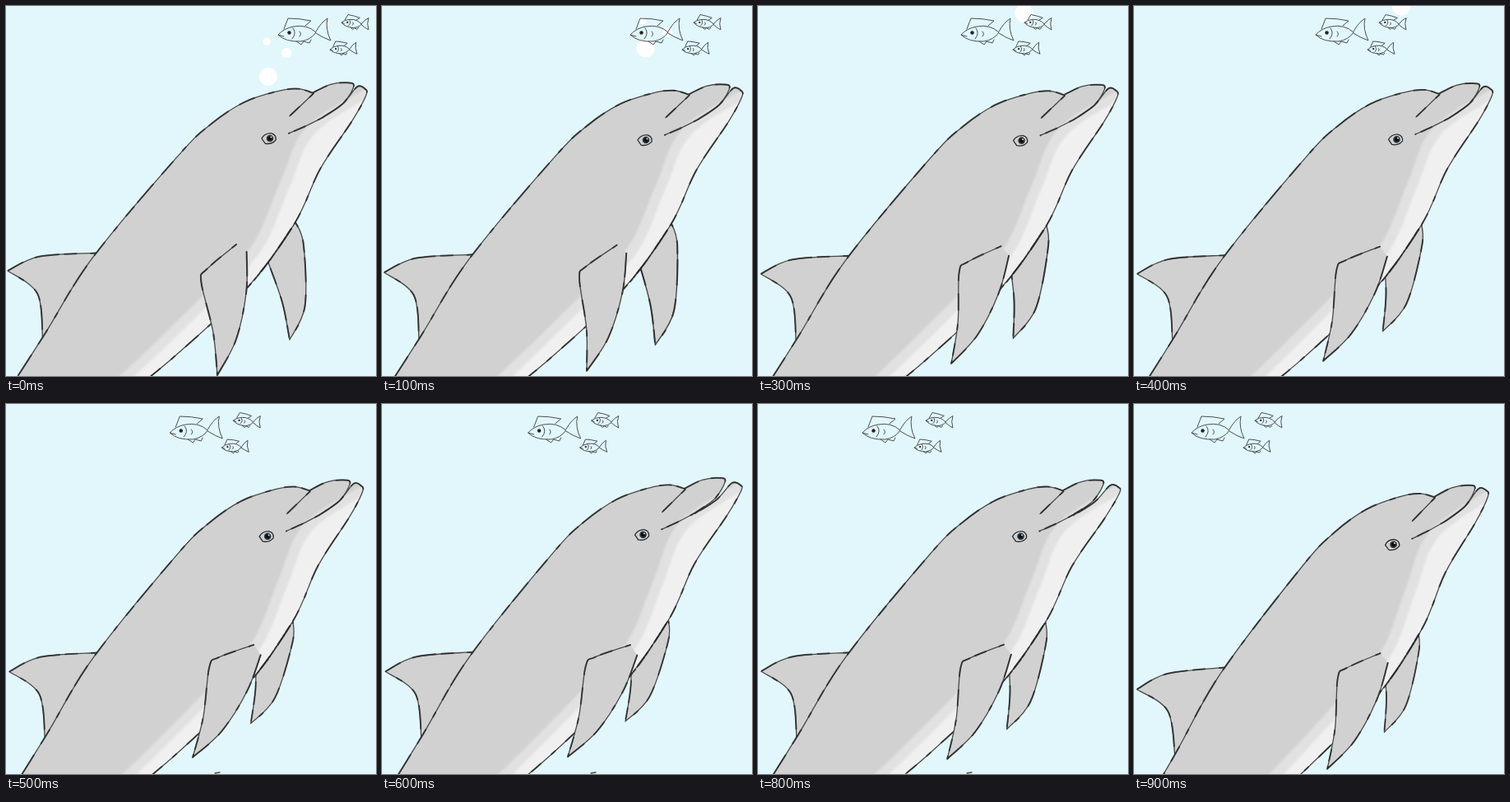
These frames come from a looping animation (450 px wide and 450 px high, 1 s). An HTML page:

```html
<!DOCTYPE html>
<html lang="en">
<head>
<meta charset="utf-8">
<title>Dolphin and fish</title>
<style>
  html, body { margin: 0; width: 100%; height: 100%; overflow: hidden; background: #e2f7fb; }
  svg { display: block; width: 100%; height: 100%; }
  .skin { fill: #d1d1d1; }
  .ink, .sketch { fill: none; stroke-linecap: round; stroke-linejoin: round; }
  .ink { stroke: #484848; stroke-width: 1.3; }
  .sketch { stroke: #262626; stroke-width: 2; opacity: .75; }
  #fish { fill: none; stroke: #4a5052; stroke-linejoin: round; stroke-linecap: round; }
  #fish path { vector-effect: non-scaling-stroke; }
  #fish circle { fill: #222; stroke: none; }
</style>
</head>
<body>
<svg viewBox="0 0 450 450">
  <defs>
    <clipPath id="inside"><path id="clip"/></clipPath>
    <filter id="soft" x="-5%" y="-5%" width="110%" height="110%"><feGaussianBlur stdDeviation="1.2"/></filter>
  </defs>
  <rect width="450" height="450" fill="#e2f7fb"/>
  <g id="bubbles" fill="#fff"></g>
  <g id="fish"></g>
  <g id="far"></g>
  <g id="body">
    <g id="fin"></g>
    <path id="hide" class="skin"/>
    <g id="belly" clip-path="url(#inside)"></g>
    <g id="lines"></g>
    <path d="M311 161Q315 154 323 155Q329 157 328 163Q323 169 315 167Z" fill="#cdd1d3" stroke="#2c2c2c" stroke-width="1.3"/>
    <circle cx="321" cy="161" r="4.3" fill="#30353a"/>
    <circle cx="321" cy="161" r="2.5" fill="#0c0c0c"/>
    <circle cx="322.500" cy="159.500" r="1" fill="#ddd"/>
  </g>
  <g id="near"></g>
  <path id="speck" d="M254 449L260 448" class="ink"/>
</svg>
<script>
const $ = id => document.getElementById(id);

let seed = 11;
const random = () => (seed = seed * 16807 % 2147483647) / 2147483647;

// Smooth curve through a flat list x, y, x, y ...
function curve(list, start = 'M') {
  const n = list.length / 2;
  const at = i => { i = Math.max(0, Math.min(n - 1, i)); return [list[2 * i], list[2 * i + 1]]; };
  let d = start + at(0);
  for (let i = 0; i < n - 1; i++) {
    const [a, b, c, e] = [at(i - 1), at(i), at(i + 1), at(i + 2)];
    const p = [0, 1].map(k => b[k] + (c[k] - a[k]) / 6);
    const q = [0, 1].map(k => c[k] - (e[k] - b[k]) / 6);
    d += `C${p} ${q} ${c}`;
  }
  return d;
}

// Turn, scale and shift that carries points a, b onto c, d
function carry([ax, ay, bx, by], [cx, cy, dx, dy]) {
  const ux = bx - ax, uy = by - ay, vx = dx - cx, vy = dy - cy;
  const len = ux * ux + uy * uy;
  const r = (ux * vx + uy * vy) / len, s = (ux * vy - uy * vx) / len;
  return `matrix(${r},${s},${-s},${r},${cx - r * ax + s * ay},${cy - s * ax - r * ay})`;
}

// Straight moves between [step, value] keys
function track(k, ...keys) {
  const i = keys.findIndex(key => key[0] >= k);
  if (i < 0) return keys[keys.length - 1][1];
  if (i === 0) return keys[0][1];
  const [[a, u], [b, v]] = [keys[i - 1], keys[i]];
  return u + (v - u) * (k - a) / (b - a);
}

// Even pencil line with darker, broken pressure over it
const dashes = Array.from({ length: 8 }, () => 6 + 26 * random());
const inked = d => `<path class="ink" d="${d}"/><path class="sketch" stroke-dasharray="${dashes}" d="${d}"/>`;
function limb(front, rear) {
  const d = curve(front) + curve(rear, 'L');
  return `<path class="skin" d="${d}Z"/>` + inked(d);
}

$('near').innerHTML = limb(
  [297, 295, 255, 312, 244, 324, 239, 385, 228, 435],
  [228, 435, 262, 402, 291, 352, 306, 307]);
$('far').innerHTML = limb(
  [349, 262, 351, 290, 332, 362, 303, 396],
  [303, 396, 307, 350, 304, 298]);
$('fin').innerHTML = limb([109, 299, 40, 303, 2, 320], [2, 320, 38, 348, 44, 403]);

const back = [-10, 484, 46, 398, 105, 305, 210, 181, 250, 143, 290, 117, 330, 104, 355, 101, 373, 106];
const beak = [373, 106, 395, 96, 415, 94, 423, 98, 410, 119, 385, 136];
const jaw = [385, 136, 410, 119, 427, 99, 436, 101, 438, 109, 421, 140, 382, 198, 350, 265,
  290, 345, 205, 424, 130, 484];
const details = curve([385, 136, 365, 146, 344, 155]) + curve([374, 107, 360, 120, 345, 134]);
const scribble = curve([346, 271, 320, 309, 301, 333]);

// The light underside is the shaded one moved toward the belly
const under = curve([440, 100, 365, 148, 333, 215, 299, 290, 240, 350, 170, 418, 105, 478]) + 'L250 490L470 260Z';
$('belly').innerHTML = [['#e1e1e1', 0], ['#f0f0f0', 11]].map(([fill, gap]) =>
  `<path d="${under}" fill="${fill}" filter="url(#soft)" transform="translate(${gap},${gap * .6})"/>`).join('');

const fish = `
  <path d="M0 0Q7 -8 19 -10Q35 -13 46 -3Q40 6 28 8Q9 9 0 0L7 2"/>
  <path d="M7 -7L12 -20Q26 -20 40 -17L33 -11M46 -4Q52 -15 60 -20Q57 -7 64 7Q55 4 46 -2"/>
  <path d="M18 -8Q23 -2 17 5M26 -4Q29 -1 26 2M22 8L28 12L31 8L38 10L40 6"/>
  <circle cx="13.500" cy="-2.500" r="2.200"/>`;
$('fish').innerHTML = [[331, 36, 1, 0], [408, 21, .53, 9], [394, 54, .52, 3]].map(([x, y, size, turn]) =>
  `<g transform="translate(${x},${y}) rotate(${turn}) scale(${size})">${fish}</g>`).join('');

function drawBody(open) {
  const pull = i => open * Math.max(0, 1 - Math.abs(i - 3) / 3.5);
  const lower = jaw.map((v, i) => v + pull(i >> 1) * (i % 2 ? 5 : 11));
  const outline = curve(back) + curve(beak, 'L') + curve(lower, 'L');
  $('hide').setAttribute('d', outline);
  $('clip').setAttribute('d', outline);
  $('lines').innerHTML = inked(outline + details) +
    `<path class="sketch" stroke-dasharray="9 3 4 2" d="${scribble}"/>`;
}

function drawBubbles(k) {
  const rise = 43 - 25 * k;
  const bubbles = k > 4 ? [] : [
    [319 + 1.5 * k, 86 - 39 * k + 4.4 * k * k, 11],
    [341 + 6 * k, rise + 14, 6],
    [317, rise, 4.5]
  ];
  $('bubbles').innerHTML = bubbles.map(([x, y, r]) => `<circle cx="${x}" cy="${y}" r="${r}"/>`).join('');
}

function draw(k) {
  const swing = Math.sin(Math.PI * k / 12);
  const lean = 3.5 * swing ** 6;
  const bob = track(k, [0, 0], [2, 4], [5, 0], [7, -4], [8, 0], [9, 10]);
  const tail = track(k, [0, 2], [2, 6], [8, 5], [9, 27]);
  const swim = track(k, [0, 0], [2, -58], [4, -110], [7, -175], [8, -204], [9, -261]);
  const sink = Math.max(0, k - 8);

  const move = (id, value) => $(id).setAttribute('transform', value);
  move('body', carry([320, 161, 2, 320], [320 - lean - 5 * sink, 161 + bob, 2 + 2 * swing, 320 + tail]));
  move('near', carry([297, 295, 228, 435],
    [280 + 22 * swing + 4 * sink, 290 + 3 * swing + 11 * sink, 257 - 31 * swing, 449 - 20 * swing + 9 * sink]));
  move('far', carry([349, 262, 303, 396],
    [352 - 4 * swing - 5 * sink, 263 - 2 * swing + 11 * sink,
      345 - 49 * swing - 6 * sink, 406 + 60 * swing * (1 - swing) - 20 * swing - 5 * sink]));
  move('fish', `translate(${swim},-1)`);
  $('speck').setAttribute('visibility', k > 4 && k < 9 ? 'visible' : 'hidden');
  drawBody(track(k, [5, 0], [7, 1], [9, 0]));
  drawBubbles(k);
}

let shown = 0;
const begin = performance.now();
function tick(now) {
  const k = Math.floor(Math.max(0, now - begin) / 100) % 10;
  if (k !== shown) draw(shown = k);
  requestAnimationFrame(tick);
}
draw(0);
requestAnimationFrame(tick);
</script>
</body>
</html>
```
